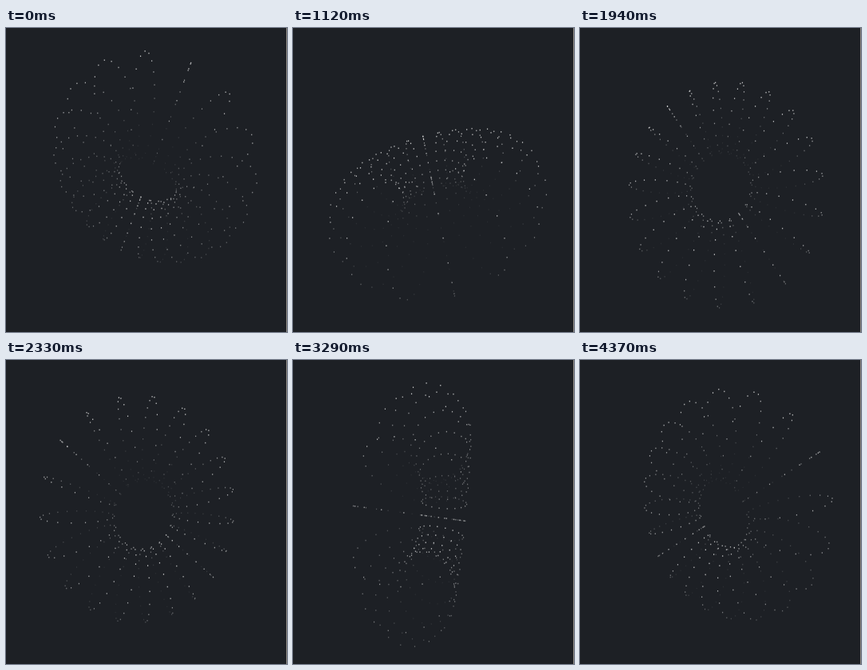
Recreate the animation shown at these times as an HTML page with a canvas. Size 352 px wide and 380 px high, loop 4.39 s.

```html
<!DOCTYPE html>
<html lang="en">
<head>
<meta charset="utf-8">
<title>Dotted torus</title>
<style>
  html, body { margin: 0; width: 100%; height: 100%; overflow: hidden; background: #1d2025; }
  canvas { display: block; }
</style>
</head>
<body>
<canvas id="stage" width="352" height="380"></canvas>
<script>
const canvas = document.getElementById('stage');
const ctx = canvas.getContext('2d');
const LOOP = 4390;
const RINGS = 20, DOTS = 20;
const TUBE = 1, RADIUS = 2, DISTANCE = 5;
const CENTER = { x: 174.2, y: 195 };
const SCALE = { x: 191.7, y: 223 };
const DOT = { w: 1.2, h: 1.5 };

// The pose is held between ticks; ticks are spread evenly between these times.
const ANCHORS = [0, 60, 580, 640, 700, 790, 1120, 1180, 1510, 1600, 1690, 1750, 2270,
  2330, 2390, 2840, 2900, 2960, 3020, 3410, 3470, 3680, 3770, 3950, 4010, 4370, LOOP];
const TICK = 65;

function heldTime(t) {
  const i = ANCHORS.findIndex(a => a > t) - 1;
  const start = ANCHORS[i], span = ANCHORS[i + 1] - start;
  const gap = span / Math.max(1, Math.round(span / TICK));
  return start + Math.floor((t - start) / gap) * gap;
}

function drawBackdrop() {
  ctx.globalAlpha = 1;
  ctx.fillStyle = '#1d2025';
  ctx.fillRect(0, 0, canvas.width, canvas.height);
  ctx.fillStyle = '#8f8b85';
  ctx.fillRect(canvas.width - 1, 0, 1, canvas.height);
}

function drawTorus(ms) {
  const s = ms / 1000;
  const tilt = 0.83 - 1.139 * s, roll = -0.41 + 0.569 * s;
  const cA = Math.cos(tilt), sA = Math.sin(tilt);
  const cB = Math.cos(roll), sB = Math.sin(roll);

  // Tilt about x, then roll about z.
  const turn = (r, h, cp, sp) => ({
    x: r * (cB * cp + sA * sB * sp) - h * cA * sB,
    y: r * (sB * cp - sA * cB * sp) + h * cA * cB,
    z: r * cA * sp + h * sA
  });

  ctx.fillStyle = '#fff';
  for (let i = 0; i < RINGS; i++) {
    const phi = i / RINGS * 2 * Math.PI;
    const cp = Math.cos(phi), sp = Math.sin(phi);
    for (let j = 0; j < DOTS; j++) {
      const theta = j / DOTS * 2 * Math.PI;
      const ct = Math.cos(theta), st = Math.sin(theta);
      const normal = turn(ct, st, cp, sp);
      const light = normal.y - normal.z;
      const p = turn(RADIUS + TUBE * ct, TUBE * st, cp, sp);
      const depth = DISTANCE + p.z;
      // Dots facing away stay faintly visible.
      ctx.globalAlpha = Math.max(0.06, 0.35 + 0.29 * light);
      ctx.fillRect(CENTER.x + SCALE.x * p.x / depth, CENTER.y - SCALE.y * p.y / depth, DOT.w, DOT.h);
    }
  }
}

function frame() {
  drawBackdrop();
  drawTorus(heldTime(performance.now() % LOOP));
  requestAnimationFrame(frame);
}
frame();
</script>
</body>
</html>
```
